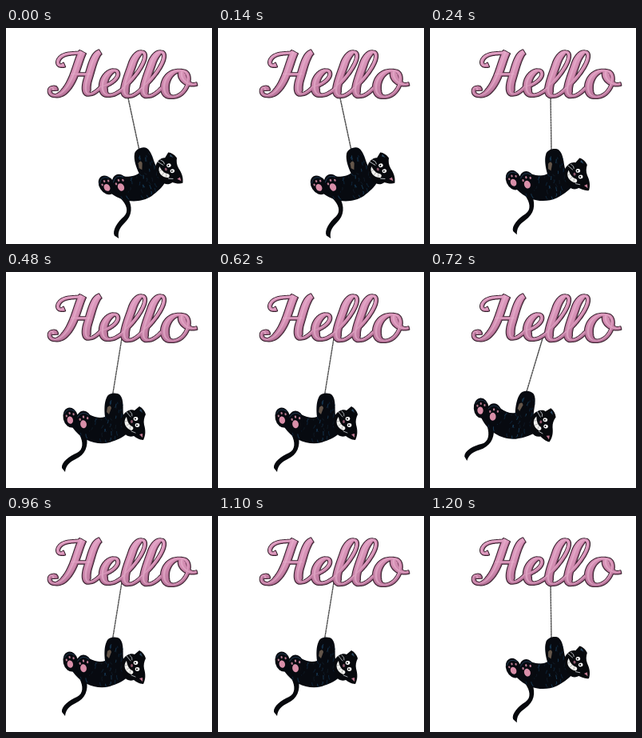
Write an HTML page that moves like this. It is 258 px wide and 270 px high and loops after 1.44 s.

```html
<!DOCTYPE html>
<html lang="en">
<head>
<meta charset="utf-8">
<title>Hello</title>
<style>
html, body { margin: 0; width: 100%; height: 100%; overflow: hidden; background: #fff; }
svg { display: block; width: 100%; height: 100%; }
</style>
</head>
<body>
<svg viewBox="0 0 258 270" role="img" aria-label="Hello, with a cat swinging on a rope">
  <defs>
    <linearGradient id="pink" x1="0" y1="28" x2="0" y2="88" gradientUnits="userSpaceOnUse">
      <stop offset="0" stop-color="#dd9abf"/>
      <stop offset=".55" stop-color="#d38db2"/>
      <stop offset="1" stop-color="#b9759b"/>
    </linearGradient>
    <clipPath id="bodyClip"><use href="#body"/></clipPath>
  </defs>

  <path id="ropeDark" stroke="#3c3c3c" stroke-width="1.3"/>
  <path id="ropeLight" stroke="#aaa" stroke-width=".8" stroke-dasharray="1.3 2"/>

  <g id="lettering" stroke-linejoin="round"></g>

  <g id="cat" stroke-linejoin="round" stroke-linecap="round" fill="none">
    <path fill="#07090d" d="M92 203C97 213 97 222 89 226C79 230 69 238 70 245L74 250C75 242 79 238 87 234C100 228 103 217 101 206Z"/>
    <path id="body" fill="#070a10" d="M84 186C88 178 94 173 104 178C112 182 118 183 124 181C123 173 123 163 126 157C128 151 139 150 143 154C148 160 146 171 147 179L153 201C146 207 139 210 130 213C114 217 95 211 83 194Z"/>
    <g id="fur" clip-path="url(#bodyClip)" stroke-width=".8"></g>
    <path fill="#64564a" d="M127 169Q131 165 132 170L129 178L126 175Z"/>
    <g id="feet"></g>

    <path fill="#07090d" d="M146 180C150 173 157 171 161 173L167 168C171 170 174 174 175 178C173 182 172 186 173 191C175 198 175 204 172 210C167 210 163 207 160 205C151 208 145 200 145 190Z"/>
    <path fill="#c07a92" d="M167 203L171 202L171 207Z"/>
    <path fill="#2c4a63" d="M167 173L169 171L171 176Z"/>
    <path fill="#f1f1ee" d="M151 181C146 187 149 195 157 198C160 197 160 194 158 193C154 191 152 187 151 181Z"/>
    <path stroke="#777" stroke-width=".5" d="M149 187L152 186M151 192L154 190M155 196L156 193"/>
    <path stroke="#cfd3d8" stroke-width=".8" d="M151 175L156 181M155 174Q159 177 158 180M157 199L162 201"/>
    <ellipse cx="157.500" cy="187" rx="1.500" ry="1.900" fill="#8a566a"/>
    <g id="eyes"></g>
  </g>
</svg>
<script>
const $ = id => document.getElementById(id);

function add(parent, tag, attrs) {
  const el = document.createElementNS("http://www.w3.org/2000/svg", tag);
  for (const key in attrs) el.setAttribute(key, attrs[key]);
  parent.append(el);
  return el;
}

// Samples a skeleton as a pen would: broad going down, fine going up.
function penLine(d) {
  const path = add($("lettering"), "path", { d, fill: "none" });
  const total = path.getTotalLength(), count = Math.ceil(total / 1.2);
  const at = s => path.getPointAtLength(Math.max(0, Math.min(total, s)));
  const line = Array.from({ length: count + 1 }, (_, i) => {
    const s = total * i / count, p = at(s), a = at(s - 2), b = at(s + 2);
    const len = Math.hypot(b.x - a.x, b.y - a.y) || 1;
    const dx = (b.x - a.x) / len, dy = (b.y - a.y) / len;
    const width = 3.4 + (dy > 0 ? 6.6 * dy ** 1.3 : -0.8 * dy);
    return { x: p.x, y: p.y, nx: -dy * width / 2, ny: dx * width / 2 };
  });
  path.remove();
  return line;
}

function ribbon(line, scale, dx, dy) {
  const side = k => line.map(p =>
    `${(p.x + dx + k * p.nx).toFixed(2)} ${(p.y + dy + k * p.ny).toFixed(2)}`);
  return `M${[...side(scale), ...side(-scale).reverse()].join("L")}Z`;
}

const curl = "M73 46C66 50 62 43 68 37C74 31 85 32 95 31";
const stem = "M96 30C89 43 86 68 71 81C62 88 53 84 55 77C57 73 61 75 60 78";
const leg = "M118 30C110 34 107 50 102 66C98 82 103 90 119 74";
const bar = "M82 58H107";
const e = "M119 74C132 71 142 62 140 56C138 49 124 56 122 70C120 84 129 91 148 75";
const l = x => `M${x} 76c12 -10 28 -30 28 -41c0 -9 -11 -5 -16 11c-5 14 -8 22 -9 30c-1 12 9 13 22 -1`;
const o = "M222 54C208 51 198 64 199 76C200 90 215 88 222 80C231 70 231 55 222 54C217 60 227 74 239 70";
const lines = [curl, stem, leg, bar, e, l(146), l(170), o].map(penLine);

function layer(attrs, scale = 1, dx = 0, dy = 0) {
  for (const line of lines) add($("lettering"), "path", { d: ribbon(line, scale, dx, dy), ...attrs });
}
layer({ fill: "#35202c", stroke: "#35202c", "stroke-width": 2 });
layer({ fill: "#9a5b7e" });
layer({ fill: "url(#pink)" }, 0.84, -0.3, -0.3);
layer({ fill: "#e9b3cf", opacity: 0.6 }, 0.25, -1, -0.4);

let seed = 17;
const rnd = () => (seed = seed * 16807 % 2147483647) / 2147483647;
for (let i = 0; i < 70; i++) {
  const x = 90 + rnd() * 58, y = 153 + rnd() * 58;
  add($("fur"), "path", {
    d: `M${x} ${y}q${rnd() * 2 - 1} 2 ${rnd() * 4 - 2} ${2 + rnd() * 3}`,
    stroke: ["#0f2a42", "#1b4261", "#101c28"][i % 3]
  });
}

function foot(x, y, size, tilt) {
  const g = add($("feet"), "g", { transform: `translate(${x} ${y}) rotate(${tilt}) scale(${size})` });
  const oval = (cx, cy, rx, ry, fill) => add(g, "ellipse", { cx, cy, rx, ry, fill });
  oval(0, 0, 10, 13.5, "#070a10");
  add(g, "path", { d: "M-7 -7Q0 -15 7 -7", stroke: "#25405a", "stroke-width": 0.8 });
  oval(-1.5, 3, 3.9, 5, "#d98fa9");
  for (const k of [-1, 0, 1]) oval(k * 4.8, -6 + 2.5 * k * k, 1.2, 1.6, "#b87990");
}
foot(81, 182, 0.94, -14);
foot(98, 187, 1, -10);

for (const k of [0, 1]) {
  const cx = 162.5 + 2 * k, cy = 183.5 + 8 * k;
  add($("eyes"), "ellipse", { cx, cy, rx: 2.8, ry: 2.4, fill: "#fff" });
  add($("eyes"), "circle", { cx: cx - 0.6, cy, r: 1, fill: "#080808" });
}

// Rope top and paw grip at each step from right to left.
const swing = [
  { top: 152, x: 167, y: 153 },
  { top: 151, x: 152, y: 154 },
  { top: 145, x: 133.5, y: 154 },
  { top: 141, x: 120.5, y: 151 }
];
const HOLD = 240, TILT = 9.3;

function draw(ms) {
  const step = Math.floor(ms / HOLD) % 6;
  const k = 3 - Math.abs(3 - step);
  const { top, x, y } = swing[k];
  for (const id of ["ropeDark", "ropeLight"]) $(id).setAttribute("d", `M${top} 83L${x} ${y}`);
  $("cat").setAttribute("transform", `translate(${x} ${y}) rotate(${(k - 2) * TILT}) translate(-133.5 -154)`);
}

const start = performance.now();
function tick() {
  draw(performance.now() - start);
  requestAnimationFrame(tick);
}
tick();
</script>
</body>
</html>
```
